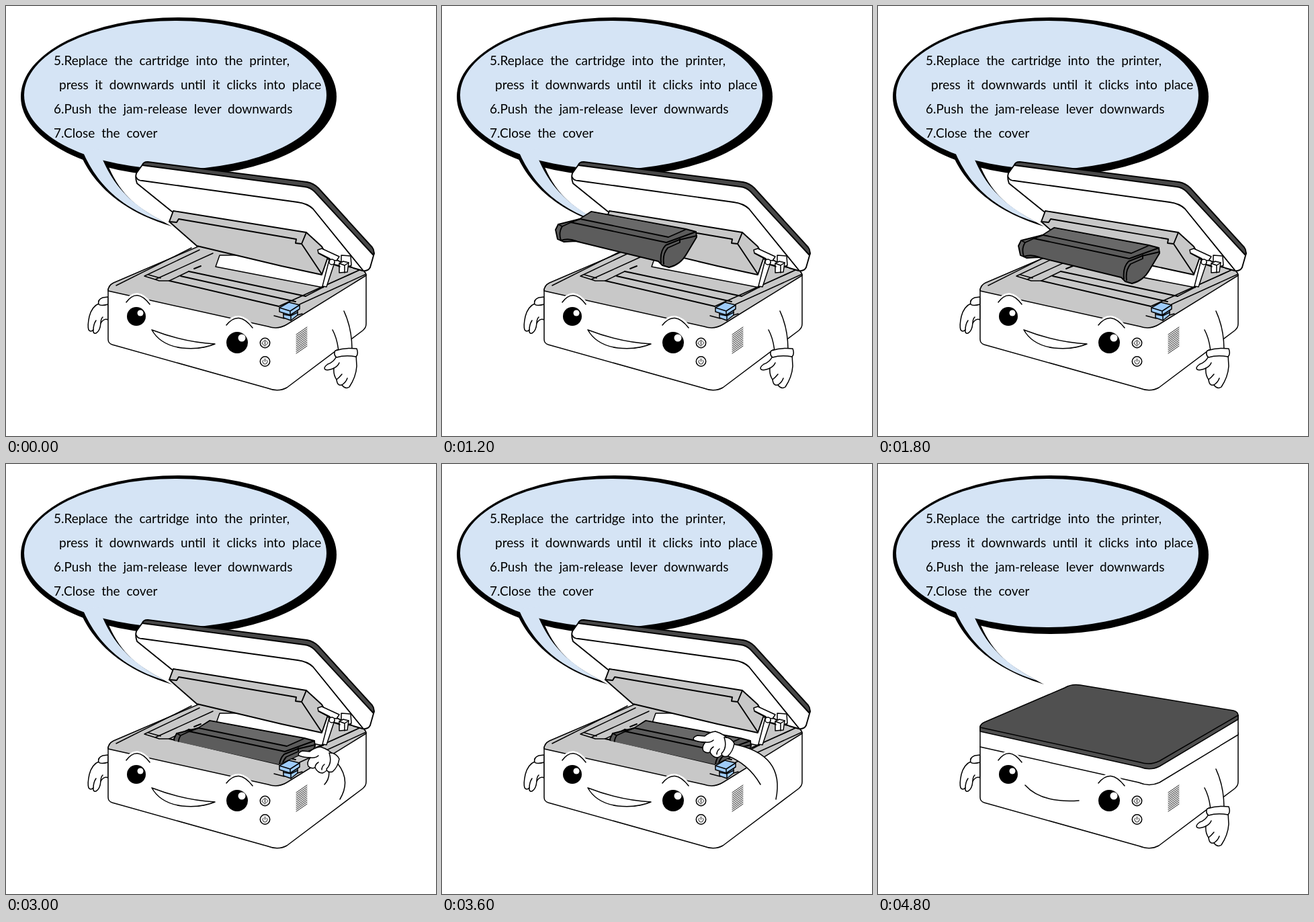
An HTML page for the animation above (6.8 s loop, 640 by 640 pixels).

```html
<!DOCTYPE html>
<html lang="en">
<head>
<meta charset="utf-8">
<title>Replace the cartridge</title>
<style>
  html, body { margin: 0; width: 100%; height: 100%; overflow: hidden; background: #fff; }
  svg { display: block; width: 100%; height: 100%; }
  text { font: 19px Lato, sans-serif; word-spacing: 5px; }
  .ink { fill: none; stroke: #000; stroke-width: 1.5; stroke-linejoin: round; stroke-linecap: round; }
  .bold { stroke-width: 1.9; }
  .thin { stroke-width: .9; }
  .white { fill: #fff; }
  .gray { fill: #c8c8c8; }
  .dark { fill: #505050; }
  .blue { fill: #9fccfa; }
</style>
</head>
<body>
<svg viewBox="0 0 640 640">
  <defs>
    <clipPath id="well"><path d="M220 340H500V403L406 447L250 412L220 405Z"/></clipPath>
    <g id="cartridge" class="ink bold">
      <path fill="#5c5c5c" d="M169 333L173 325L205 317L222 306L363 332L378 336L379 344L364 369Q355 385 338 389L328 386L322 380L199 350L181 351L172 347Z"/>
      <path fill="#696969" stroke="none" d="M206 317L223 307L361 333L336 344Z"/>
      <path d="M205 317L192 322L334 352L378 336M206 317L337 344L362 333M173 325L179 328L192 322M179 328Q173 337 177 349M200 350Q188 345 177 349M326 382Q324 365 333 356L353 348L379 342M330 384Q328 369 336 360L354 352L354 347"/>
    </g>
    <g id="hand" class="ink white">
      <path d="M452 428L441 427Q433 430 436 434Q443 437 453 437Q447 444 450 450Q454 454 460 452Q464 460 471 460Q477 458 480 452L487 433Q481 425 468 421Q459 422 452 428Z"/>
      <path d="M453 437Q461 438 465 434M460 452Q460 447 465 444M470 455Q470 450 474 447"/>
      <path d="M481 430Q491 429 496 439Q494 451 486 458Q478 460 477 454Q486 445 481 430Z"/>
    </g>
  </defs>

  <!-- speech bubble -->
  <ellipse cx="257" cy="135" rx="235" ry="118"/>
  <path d="M110 219C125 255 160 302 247 328C205 305 175 290 153 240L145 220Z"/>
  <g fill="#d5e4f5">
    <ellipse cx="252" cy="132.500" rx="225" ry="110.500"/>
    <path d="M114 216C132 258 165 300 236 322C202 303 167 282 144 229L146 212Z"/>
  </g>
  <text x="71" y="88">5.Replace the cartridge into the printer,</text>
  <text x="79" y="124">press it downwards until it clicks into place</text>
  <text x="71" y="160">6.Push the jam-release lever downwards</text>
  <text x="71" y="196">7.Close the cover</text>

  <!-- left arm and body -->
  <g class="ink white">
    <path d="M138 443Q128 447 124 462Q121 476 123 482Q126 486 130 482Q129 488 134 487Q140 484 141 472Q146 464 152 467V440Z"/>
    <path d="M130 482Q130 474 134 468M141 472Q141 466 144 463"/>
    <path d="M152 433L144 434Q136 437 138 444Q141 447 152 444Z"/>
    <path d="M152 421V496Q152 502 158 504L390 569Q405 575 418 568L531 483Q536 479 536 473V400L405 440Z"/>
  </g>

  <g id="open" class="ink">
    <path class="gray" d="M152 424Q152 416 160 412L300 352L525 391Q536 394 536 401L418 474Q405 482 390 477Z"/>
    <path d="M164 416L276 360M206 402L288 363M206 402L222 407L308 368M212 400L230 405M222 407L228 409L243 409L272 395"/>
    <path class="white" d="M318 371L312 388L472 419L484 380L470 370Z"/>
    <path class="bold" d="M272 395L446 432M260 402L431 440M243 409L406 447L526 393M280 391L290 387"/>
    <path d="M446 432L473 418M437 444L536 399"/>
    <g id="seated" clip-path="url(#well)"><use href="#cartridge" x="81" y="76"/></g>

    <!-- raised lid -->
    <g class="bold">
      <path class="white" d="M204 235L194 249Q192 256 195 264L247 306L440 390L480 372L517 390L531 394Q539 395 542 389L548 368L460 270L449 263Z"/>
      <path d="M194 255Q196 260 203 260L434 292Q449 294 457 302L531 393"/>
      <path fill="#484848" d="M203 237Q204 232 211 232L448 262Q458 264 465 271L545 359Q549 364 547 371L459 276Q453 270 444 269Z"/>
      <path class="gray" d="M249 305L447 337L470 358L479 374L470 400L410 387L284 357L243 321Z"/>
      <path d="M243 321L254 322L257 317L432 347L431 353L440 354L447 337M440 354L470 399"/>
    </g>
    <!-- hinge -->
    <g class="white">
      <path d="M481 378L471 417L477 418L489 382Z"/>
      <path d="M464 363L470 361L496 373L492 379L484 378L465 368Z"/>
      <path d="M499 371L513 372L514 386L499 392Z"/>
      <path d="M496 383L502 380L510 382L508 396L496 397Z"/>
      <path d="M496 383L504 386L510 382M504 386V397"/>
      <circle cx="485" cy="381" r="4"/>
      <path d="M466 368L482 376M497 388L488 385"/>
    </g>
    <path d="M399 461L414 465M434 460L441 458"/>
    <g id="leverUp" class="blue">
      <path d="M413 456L434 453V460L424 468L413 464Z"/>
      <path d="M424 458V468M413 459L424 461L434 456"/>
      <path d="M407 449L421 441L437 445V451L423 460L407 455Z"/>
      <path d="M407 449L423 454L437 445M423 454V460"/>
    </g>
    <g id="leverDown" class="blue">
      <path d="M406 459L421 450L437 455V458L423 468L406 462Z"/>
      <path d="M406 459L423 465L437 455M423 465V468"/>
    </g>
  </g>

  <g id="closed" class="ink">
    <path class="white" d="M152 390V421L388 474Q404 481 419 474L536 403V374Z"/>
    <path class="dark" d="M152 392Q152 387 159 384L278 333Q288 327 301 329L529 367Q536 369 536 374V380L419 450Q405 457 390 451L152 398Z"/>
    <path d="M152 392L390 444Q405 449 419 442L536 374"/>
  </g>

  <!-- face -->
  <g class="white">
    <path stroke="#fff" stroke-width="7" d="M179 441Q195 419 214 444M328 475Q346 452 367 479"/>
    <path class="ink" d="M179 441Q195 419 214 444M328 475Q346 452 367 479"/>
    <circle cx="194" cy="462" r="14" fill="#000"/>
    <circle cx="200" cy="457" r="4.500"/>
    <circle cx="344" cy="501" r="16" fill="#000"/>
    <circle cx="351" cy="494" r="5.500"/>
    <path id="mouth" class="ink" d="M217 482Q263 500 311 503Q289 512 262 509Q230 505 217 482Z"/>
    <path id="smile" class="ink" d="M219 478Q243 505 299 501"/>
  </g>

  <!-- buttons and vent -->
  <g class="ink">
    <circle cx="385.500" cy="501.500" r="7.200"/>
    <circle cx="385.500" cy="529" r="7.200"/>
    <g class="thin">
      <path d="M381 501.500L385.500 497L390 501.500L385.500 506ZM385.500 499V504"/>
      <path d="M383 527A3.500 3.500 0 1 0 388 527M385.500 525V529"/>
      <path id="vent"/>
    </g>
  </g>

  <g id="armDown" class="ink white">
    <path stroke="none" d="M503 454Q515 480 515 512L494 514L487 482Z"/>
    <path fill="none" d="M503 454Q515 480 515 512M486 482Q493 495 495 514"/>
    <path d="M492 521Q488 530 479 533Q472 538 475 541Q479 543 488 539Q487 549 492 556Q493 566 500 564Q505 571 511 567Q521 552 522 536L521 519Z"/>
    <path d="M488 539Q494 536 496 531M492 556Q496 553 500 548M500 564Q506 560 508 554"/>
    <path d="M490 513Q506 508 522 510Q525 518 521 522Q505 519 492 523Q487 519 490 513Z"/>
  </g>
  <g id="armUp">
    <path id="sleeve" class="ink white"/>
    <use id="reach" href="#hand"/>
  </g>
  <use id="flying" href="#cartridge"/>
</svg>
<script>
  const LOOP = 6800, STEP = 600;
  const flight = [[-65, -28], [0, 0], [40, 24], [60, 48]];
  const $ = id => document.getElementById(id);
  const show = (id, on) => $(id).style.display = on ? '' : 'none';
  const move = (id, [x, y]) => $(id).setAttribute('transform', `translate(${x} ${y})`);

  let lines = '';
  for (let i = 0; i < 11; i++) lines += `M432 ${489 + i * 2.8}L448 ${478 + i * 2.8}`;
  $('vent').setAttribute('d', lines);

  function draw() {
    // 0 empty, 1-4 cartridge flies in, 5 seated, 6 hand pushes, 7 lever down, 8 closed
    const step = Math.min(8, Math.floor(performance.now() % LOOP / STEP));
    const closed = step === 8, pushing = step === 6;
    const flying = step >= 1 && step <= 4, seated = step >= 5 && !closed;

    show('open', !closed);
    show('closed', closed);
    show('mouth', !closed);
    show('smile', closed);
    show('seated', seated);
    show('armUp', seated);
    show('armDown', !seated);
    show('leverUp', step < 7);
    show('leverDown', step === 7);
    show('flying', flying);
    if (flying) move('flying', flight[step - 1]);
    move('reach', pushing ? [-61, -23] : [0, 0]);
    $('sleeve').setAttribute('d', pushing
      ? 'M474 477Q456 446 424 434L434 417Q511 432 497 499'
      : 'M474 477Q483 467 480 455L493 445Q514 471 497 499');
    requestAnimationFrame(draw);
  }
  draw();
</script>
</body>
</html>
```
